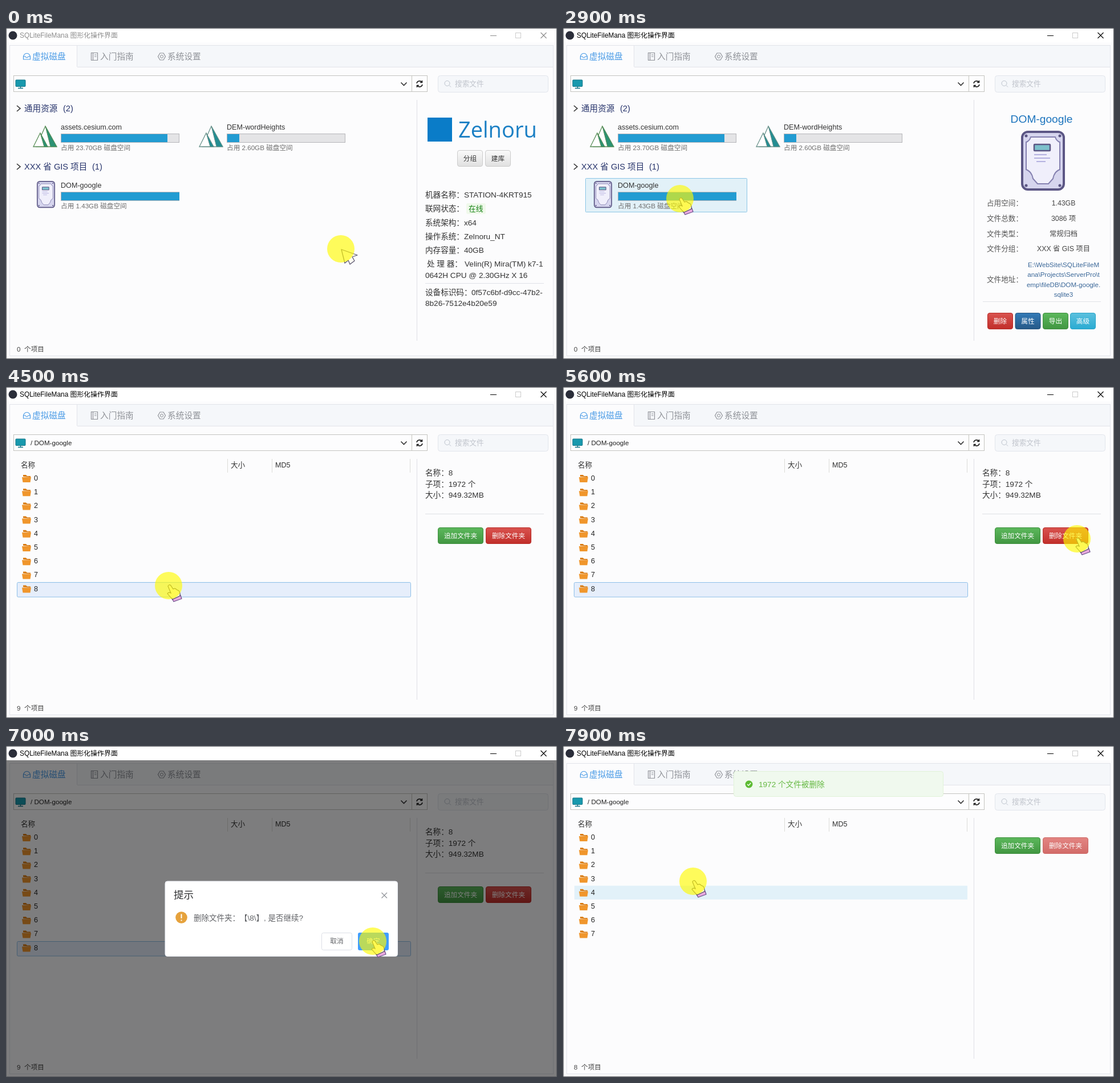
An HTML page for the animation above (8 s loop, 966 px wide and 580 px high).

```html
<!DOCTYPE html>
<html lang="zh">
<head>
<meta charset="utf-8">
<style>
html, body { margin: 0; width: 100%; height: 100%; overflow: hidden; background: #fcfcfd; }
svg { display: block; width: 966px; height: 580px; font-family: 'Liberation Sans', 'Noto Sans CJK SC', 'Noto Sans CJK', sans-serif; }
text { white-space: pre; text-spacing-trim: space-all; }
</style>
</head>
<body>
<svg id="stage" viewBox="0 0 966 580"></svg>
<script>
const LOOP = 8000;
// Moments of the clicks and their results
const SELECT = 2300, OPEN = 3300, PICK = 4300, ASK = 5680, CONFIRM = 7150, DONE = 7400;
// Pointer stops: time, x, y
const PATH = [
  [300, 587, 387], [1200, 205, 299], [3500, 205, 299], [4150, 285, 348],
  [4650, 285, 348], [5450, 901, 266], [5950, 901, 266], [6750, 643, 342],
  [7300, 643, 342], [7850, 228, 237]
];
const ROW_TOP = 148, ROW = 24.2;
const TIP = 8; // the active point lies this far below the halo's centre

const text = (x, y, s, size = 12.6, fill = '#333', anchor = 'start', more = '') =>
  `<text x="${x}" y="${y}" font-size="${size}" fill="${fill}" text-anchor="${anchor}" ${more}>${s}</text>`;
const rect = (x, y, w, h, fill = 'none', stroke = 'none', rx = 0, more = '') =>
  `<rect x="${x}" y="${y}" width="${w}" height="${h}" fill="${fill}" stroke="${stroke}" rx="${rx}" ${more}/>`;
const path = (d, stroke = '#333', fill = 'none', width = 1, more = '') =>
  `<path d="${d}" stroke="${stroke}" fill="${fill}" stroke-width="${width}" ${more}/>`;
const circle = (x, y, r, fill, stroke = 'none', more = '') =>
  `<circle cx="${x}" cy="${y}" r="${r}" fill="${fill}" stroke="${stroke}" ${more}/>`;
const group = (id, body) => `<g id="${id}">${body}</g>`;
const at = (x, y, body) => `<g transform="translate(${x} ${y})">${body}</g>`;
const gradient = (id, top, bottom) =>
  `<linearGradient id="${id}" x2="0" y2="1"><stop stop-color="${top}"/><stop offset="1" stop-color="${bottom}"/></linearGradient>`;

const button = (x, y, w, s, kind, edge, color = '#fff') =>
  rect(x + .5, y + .5, w - 1, 28, `url(#${kind})`, edge, 3.5) +
  text(x + w / 2, y + 19, s, 11.64, color, 'middle');

const drive = rect(2, 2, 73, 101, '#d6d5ee', '#5c5785', 10, 'stroke-width="4"') +
  path('M17 11H60Q62 18 68 20V68Q58 72 56 84L48 93H29L21 84Q19 72 9 68V20Q15 18 17 11Z', '#8581b0', '#f0effb', 2) +
  [[9, 9], [68, 9], [9, 96], [68, 96]].map(([x, y]) => circle(x, y, 2.5, '#5c5785')).join('') +
  rect(23, 24, 28, 11, '#7cc0cc', '#5c5785', 1, 'stroke-width="2.5"') +
  path('M23 42H45M23 48H51M27 54H43', '#b5b2e0', 'none', 2);

const peaks = (line, fill) =>
  path('M22 1L42 37H6Z', line, '#fff', 1.3) + path('M22 1L42 37H31Z', line, fill) +
  path('M13 13L26 37H1Z', line, '#fff', 1.3) + path('M13 13L26 37H20Z', line, fill);

const store = (x, y, icon, name, size, used) => at(x, y, icon +
  text(49, 16, name) +
  rect(49.5, 23.5, 207, 15, '#e4e4e6', '#b6b6ba') + rect(50, 24, used, 14, '#229cd2') +
  text(49, 52, `占用 ${size} 磁盘空间`, 11.64, '#6d6d6d'));

const heading = (y, s, count, x) =>
  path(`M19 ${y - 5}l6 5-6 5`, '#333', 'none', 1.6) +
  text(32, y + 5, s, 14.6, '#26336b') + text(x, y + 5, `(${count})`, 14.6, '#26336b');

const rowY = n => ROW_TOP + n * ROW;
const folder = n => group('row' + n, at(28, rowY(n) + 6,
  path('M2 3V0H7L9 2H15V4Z', 'none', '#d97b12') + path('M0 4H16L14.5 13H1.5Z', 'none', '#f0962c')) +
  text(49, rowY(n) + 16, n, 12.6, '#222'));

const info = [
  [297, '机器名称：', 'STATION-4KRT915'], [345.5, '系统架构：', 'x64'],
  [370, '操作系统：', 'Zelnoru_NT'], [394, '内存容量：', '40GB']
];
const machine =
  rect(739, 157, 43, 42, '#0a7cc8') +
  text(793, 192, 'Zelnoru', 38, '#1a7fc4', 'start', 'font-family="Open Sans, Noto Sans, sans-serif"') +
  button(791, 214, 45, '分组', 'grey', '#ccc', '#333') + button(840, 214, 45, '建库', 'grey', '#ccc', '#333') +
  info.map(([y, k, v]) => text(735, y, k, 13.6) + text(803, y, v, 13.6)).join('') +
  text(735, 321, '联网状态：', 13.6) + rect(807, 307, 34, 19, '#f0f9eb', 'none', 3) +
  text(811, 321, '在线', 12.8, '#148014') +
  text(738, 418, '处 理 器：', 13.6) + text(804, 418, 'Velin(R) Mira(TM) k7-1', 13.6) +
  text(735, 438, '0642H CPU @ 2.30GHz X 16', 13.6) +
  path('M735 447.5H943', '#e0e2e8') +
  text(735, 468, '设备标识码：', 13.6) + text(816, 468, '0f57c6bf-d9cc-47b2-', 13.6) +
  text(735, 487, '8b26-7512e4b20e59', 13.6);

const facts = [['占用空间：', '1.43GB'], ['文件总数：', '3086 项'], ['文件类型：', '常规归档'], ['文件分组：', 'XXX 省 GIS 项目']];
const place = ['E:\\WebSite\\SQLiteFileM', 'ana\\Projects\\ServerPro\\t', 'emp\\fileDB\\DOM-google.', 'sqlite3'];
const detail =
  text(839, 166, 'DOM-google', 19.2, '#1c74bd', 'middle') + at(803, 180, drive) +
  facts.map(([k, v], i) => text(743, 311 + i * 26.8, k, 12.6, '#555') +
    text(877.5, 311 + i * 26.8, v, 12.3, '#444', 'middle')).join('') +
  text(743, 444.5, '文件地址：', 12.6, '#555') +
  place.map((s, i) => text(877.5, 419 + i * 17.3, s, 11.64, '#3a6798', 'middle')).join('') +
  path('M736 479.5H943', '#e0e2e8') +
  button(744, 499, 45, '删除', 'red', '#b92c28') + button(792.5, 499, 45, '属性', 'blue', '#245580') +
  button(841, 499, 45, '导出', 'green', '#3e8f3e') + button(889, 499, 45, '高级', 'cyan', '#28a4c9');

const home = heading(141, '通用资源', 2, 100) + heading(243, 'XXX 省 GIS 项目', 1, 151) +
  group('hoverStore', rect(0, 0, 281, 58, '#e2f1f9')) +
  group('pickedStore', rect(39.5, 263.5, 283, 59, '#e2f1f8', '#8cc6e6', 1)) +
  store(47, 162, at(0, 9, peaks('#5b8f5a', '#2b9273')), 'assets.cesium.com', '23.70GB', 186) +
  store(338, 162, at(0, 9, peaks('#6b938c', '#238d92')), 'DEM-wordHeights', '2.60GB', 21) +
  store(47, 264, `<g transform="translate(7 4) scale(.416 .45)">${drive}</g>`, 'DOM-google', '1.43GB', 207) +
  group('machine', machine) + group('detail', detail);

const list = text(26, 141, '名称') + text(394, 141, '大小') + text(472, 141, 'MD5') +
  path('M388.5 126V150M466.5 126V150M708.5 126V150', '#dcdcd8') +
  group('hoverRow', rect(20, 0, 689, ROW, '#e2f1f9')) +
  group('pickedRow', rect(19.5, 342.5, 690, 25.5, '#e6eefb', '#8fbfe8', 2)) +
  [...Array(9).keys()].map(folder).join('') +
  group('rowInfo', text(735, 155, '名称：8', 13.6) + text(735, 174.5, '子项：1972 个', 13.6) +
    text(735, 194, '大小：949.32MB', 13.6) + path('M735 222.5H943', '#dfe0e4')) +
  group('tools', button(757, 246, 80, '追加文件夹', 'green', '#3e8f3e') +
    group('remove', button(841, 246, 80, '删除文件夹', 'red', '#b92c28')));

const titleBar = rect(1, 1, 964, 24, '#fff') + circle(12, 13, 7.5, '#2b2e3a') +
  group('caption', text(24, 17, 'SQLiteFileMana 图形化操作界面', 11.9, 'currentColor') +
    path('M849 13.5H860M937.5 8L947.5 18M947.5 8L937.5 18', 'currentColor', 'none', 1.1)) +
  rect(893.5, 8.5, 9, 9, 'none', '#ccc');

const tabs = rect(6.5, 30.5, 953, 544, '#fcfcfd', '#e2e4ea') +
  rect(7, 31, 952, 37, '#f5f7fa') + path('M125 68.5H960', '#e2e4ea') +
  rect(7, 31, 117, 39, '#fcfcfd') + path('M124.5 31V68', '#e2e4ea') +
  path('M30.5 50Q32 44.5 36.5 44.5Q41 44.5 42.5 50V55H30.5ZM30.5 50H34Q36.5 54 39 50H42.5', '#4a9be6', 'none', 1.2) +
  text(46, 55, '虚拟磁盘', 14.7, '#4a9be6') +
  path('M149.5 43.5H160.5V56.5H149.5ZM152.5 43.5V56.5M155 47H158.5M155 50H158.5', '#909399', 'none', 1.2) +
  text(165, 55, '入门指南', 14.7, '#909399') +
  path('M270 44H276L279.5 50L276 56H270L266.5 50Z', '#909399', 'none', 1.2) + circle(273, 50, 2.6, 'none', '#909399') +
  text(283, 55, '系统设置', 14.7, '#909399');

const addressBar = rect(13.5, 83.5, 725, 28, '#fdfdfe', '#c4c4c0') + path('M711.5 84V111', '#c4c4c0') +
  rect(17, 91, 17, 11.5, '#1899ad', '#127486', 1) + path('M25.5 102V105M21 105.5H30', '#127486', 'none', 1.4) +
  path('M692.5 95.5L697.5 100.5L702.5 95.5', '#333', 'none', 1.6) +
  path('M720 97A5 5 0 0 1 729 95M730 99A5 5 0 0 1 721 101M729.5 92V95.5H726M720.5 104V100.5H724', '#222', 'none', 1.6) +
  group('crumb', text(43, 102, '/ DOM-google', 11.64, '#222')) +
  rect(757.5, 83.5, 193, 29, '#f5f7fa', '#e2e5ec', 4) +
  circle(773.5, 97, 4.5, 'none', '#bcc2cc') + path('M777 100.5L780 103.5', '#bcc2cc') +
  text(787, 101.5, '搜索文件', 12.7, '#c0c4cc');

const dialog = rect(279, 237, 407.5, 131.5, '#fff', '#ebeef5', 4) +
  text(294, 267, '提示', 17.5, '#303133') + path('M658.5 257L668 266.5M668 257L658.5 266.5', '#909399', 'none', 1.2) +
  circle(307.5, 300.5, 10.3, '#e6a23c') + path('M307.5 294.5V302M307.5 304.5V306.5', '#fff', 'none', 2) +
  text(329, 305.5, '删除文件夹：【\\8\\】, 是否继续?', 13.5, '#606266') +
  rect(553.5, 327.5, 53, 30, '#fff', '#dcdfe6', 3) + text(580, 346, '取消', 11.64, '#606266', 'middle') +
  rect(617, 327, 54, 31, '#409eff', 'none', 3) + text(644, 346, '确定', 11.64, '#fff', 'middle');

const toast = rect(299.5, 44.5, 367, 44, '#f0f9ee', '#e1f3d8', 4) + circle(326, 67, 6.5, '#5dbb33') +
  path('M323 67L325.3 69.3L329.3 64.8', '#fff', 'none', 1.4) +
  text(343, 72, '1972 个文件被删除', 13.6, '#67b944');

// The translucent halo lies over the cursor
const pointer =
  group('arrow', path('M1 1L29 11L20 14L24 21L16 27L13 20L7 25Z', '#5b5670', '#fffdf2', 1.3, 'stroke-linejoin="round"')) +
  group('hand', path('M6 23L21 17L23 23L9 28Z', '#6a4f8a', '#e9a9e0', 1.2) +
    path('M-1 1Q1 -3 4 0L8 6Q12 4 14 7L18 9Q21 13 20 18L7 24Q2 19 -2 14Q0 11 4 13Z', '#555060', '#fff8e0', 1.2)) +
  circle(0, 0, 24, '#fffa00', 'none', 'fill-opacity=".64"');

const stage = document.getElementById('stage');
stage.innerHTML = '<defs>' +
  gradient('grey', '#fafafa', '#e0e0e0') + gradient('red', '#d9534f', '#c12e2a') +
  gradient('blue', '#337ab7', '#265a88') + gradient('green', '#5cb85c', '#419641') + gradient('cyan', '#5bc0de', '#2aabd2') +
  '<clipPath id="page"><path d="M0 25H966V580H0Z"/></clipPath></defs>' +
  rect(0, 0, 966, 580, '#fcfcfd') + titleBar + tabs + addressBar + path('M720.5 126V548', '#dfdfe6') +
  group('home', home) + group('list', list) +
  `<text id="count" x="19" y="567" font-size="11.64" fill="#444"></text>` + text(32, 567, '个项目', 11.64, '#444') +
  group('shade', rect(1, 25, 964, 554, '#000')) + group('dialog', dialog) +
  `<g clip-path="url(#page)">${group('toast', toast)}</g>` +
  rect(.5, .5, 965, 579, 'none', '#55575c') + group('pointer', pointer);

const el = {};
stage.querySelectorAll('[id]').forEach(node => el[node.id] = node);
const show = (id, on) => el[id].style.display = on ? '' : 'none';
const move = (id, x, y) => el[id].setAttribute('transform', `translate(${x} ${y})`);
const fade = (id, v) => { el[id].setAttribute('opacity', v); show(id, v > 0); };
const clamp = v => Math.min(1, Math.max(0, v));
const ease = (t, start, length) => 1 - Math.pow(1 - clamp((t - start) / length), 2.2);
const inside = (p, x, y, w, h) => p.x >= x && p.x <= x + w && p.y >= y && p.y <= y + h;

function pointerAt(t) {
  const i = PATH.findIndex(k => k[0] > t);
  const b = PATH[i < 0 ? PATH.length - 1 : i], a = i < 1 ? b : PATH[i - 1];
  const p = a === b ? 0 : (t - a[0]) / (b[0] - a[0]), s = p * p * (3 - 2 * p);
  return { x: a[1] + (b[1] - a[1]) * s, y: a[2] + (b[2] - a[2]) * s };
}

function draw(t) {
  const p = pointerAt(t), tip = { x: p.x, y: p.y + TIP };
  const opened = t >= OPEN, picked = t >= PICK && t < DONE, done = t >= DONE;
  const modal = t >= ASK && t < CONFIRM + 200, total = done ? 8 : 9;

  el.caption.style.color = t < SELECT ? '#8c8c8c' : '#000';
  show('home', !opened);
  show('list', opened);
  show('crumb', opened);
  show('machine', t < SELECT);
  show('detail', t >= SELECT);
  show('pickedStore', t >= SELECT);
  el.count.textContent = opened ? total : 0;

  const spot = opened ? null : [[40, 162], [331, 162], [40, 264]].find(([x, y]) => inside(tip, x, y, 281, 58));
  show('hoverStore', spot);
  if (spot) move('hoverStore', ...spot);

  const row = Math.floor((tip.y - ROW_TOP) / ROW);
  const onRow = opened && !modal && tip.x > 19 && tip.x < 710 && row >= 0 && row < total;
  show('hoverRow', onRow);
  if (onRow) move('hoverRow', 0, rowY(row));
  show('pickedRow', picked);
  show('rowInfo', picked);
  show('row8', !done);
  move('tools', 0, picked ? 0 : -86);
  el.remove.setAttribute('opacity', picked ? 1 : .7);

  fade('shade', .5 * (ease(t, ASK, 200) - ease(t, CONFIRM, 200)));
  const open = ease(t, ASK, 300) - ease(t, CONFIRM, 300);
  fade('dialog', open);
  move('dialog', 0, -20 * (1 - open));
  fade('toast', ease(t, DONE, 300));
  move('toast', 0, -45 * (1 - ease(t, DONE, 400)));

  const onButton = modal ? inside(tip, 553, 327, 118, 31) : picked && inside(tip, 757, 246, 164, 29);
  const hand = spot || onRow || onButton;
  show('hand', hand);
  show('arrow', !hand);
  move('pointer', p.x, p.y);
}

function tick() {
  draw(performance.now() % LOOP);
  requestAnimationFrame(tick);
}
tick();
</script>
</body>
</html>
```
